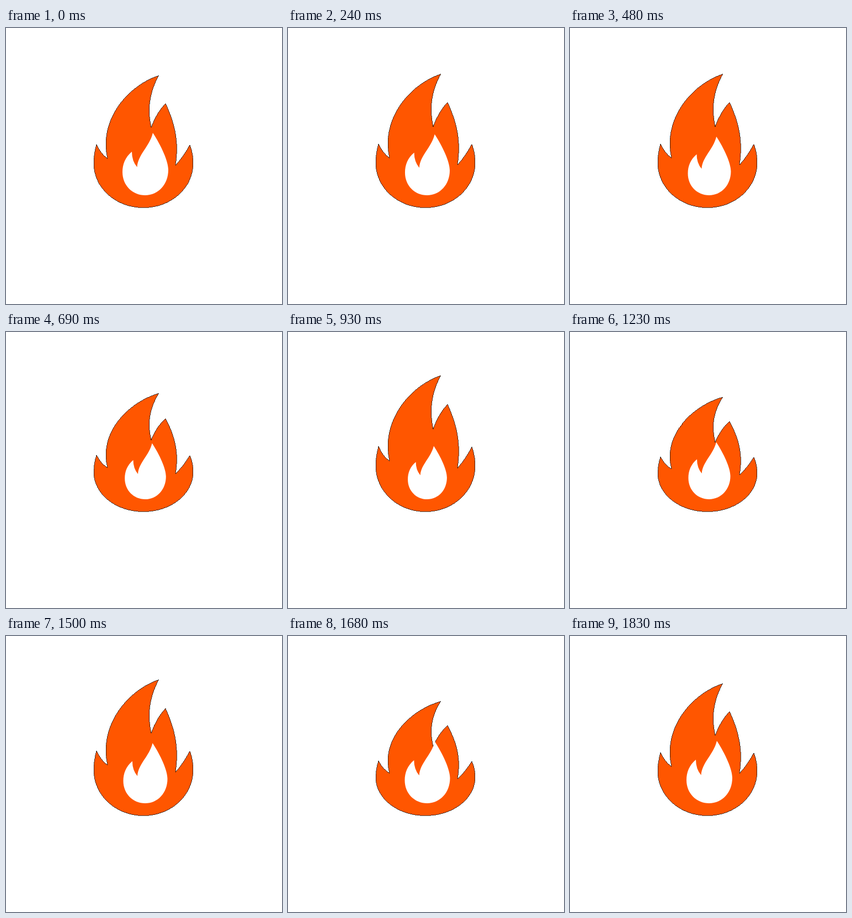
These frames come from a looping animation (500 px wide and 500 px high, 1.86 s). An HTML page:

```html
<!DOCTYPE html>
<html lang="en">
<head>
<meta charset="utf-8">
<title>Flame</title>
<style>
  html, body { margin: 0; width: 100%; height: 100%; overflow: hidden; background: #fff; }
  svg { display: block; width: 100%; height: 100%; }
</style>
</head>
<body>
<svg viewBox="0 0 500 500">
  <path id="flame" fill="#ff5600" stroke="#000" stroke-width=".7"
    vector-effect="non-scaling-stroke" shape-rendering="crispEdges" d="
    M276.5 86.5
    C227 103 181 152 181 211 Q181 224 184 236.5
    Q172 229 164 211
    C161 222 159 234 159 245
    C159 290 199 325.5 249 325.5
    C299 325.5 339 290 339 245
    C339 234 337 222 333 212
    Q321 234 307 249
    C312.5 210 308.5 179 289 137
    Q273 153 263 180.5
    C256 148 259 119 276.5 86.5Z"/>
  <path id="core" fill="#fff" d="
    M266 190
    C260 215 239 229 237.5 252
    Q228 241 228 224
    C216 234 211 247 211 261
    C211 285 229 303 252 303
    C276 303 294 283 294 257
    C294 241 281 213 266 190Z"/>
</svg>
<script>
  const LOOP = 1860, STEP = 30, LAST = LOOP - STEP;
  const FLAME_BASE = 325.5, REST_TIP = 86.5, HIGH_TIP = 75.5, LOW_TIP = 118.5;
  const CORE_X = 252.5, CORE_BASE = 303, CORE_SHRINK = .15;
  // Moments of full height; the flame dips halfway between neighbours.
  const PEAKS = [-960, 192, 528, 971, 1457, 1905];

  const flame = document.getElementById('flame');
  const core = document.getElementById('core');

  function tipAt(t) {
    const next = PEAKS.findIndex(peak => peak > t);
    const phase = (t - PEAKS[next - 1]) / (PEAKS[next] - PEAKS[next - 1]);
    const dip = (1 - Math.cos(2 * Math.PI * phase)) / 2;
    return HIGH_TIP + (LOW_TIP - HIGH_TIP) * dip;
  }

  // Shrinks towards the middle of the loop and grows back.
  function coreSizeAt(t) {
    const nearMiddle = 1 - Math.abs(2 * t / LAST - 1);
    return 1 - CORE_SHRINK * nearMiddle ** 1.4;
  }

  function scaleAbout(node, x, y, sx, sy) {
    node.setAttribute('transform',
      `translate(${x} ${y}) scale(${sx} ${sy}) translate(${-x} ${-y})`);
  }

  function draw(time) {
    const t = Math.floor((time % LOOP) / STEP) * STEP;
    const stretch = (FLAME_BASE - tipAt(t)) / (FLAME_BASE - REST_TIP);
    const size = coreSizeAt(t);
    scaleAbout(flame, 0, FLAME_BASE, 1, stretch);
    scaleAbout(core, CORE_X, CORE_BASE, size, size);
  }

  const start = performance.now();
  function tick() {
    draw(performance.now() - start);
    requestAnimationFrame(tick);
  }
  tick();
</script>
</body>
</html>
```
